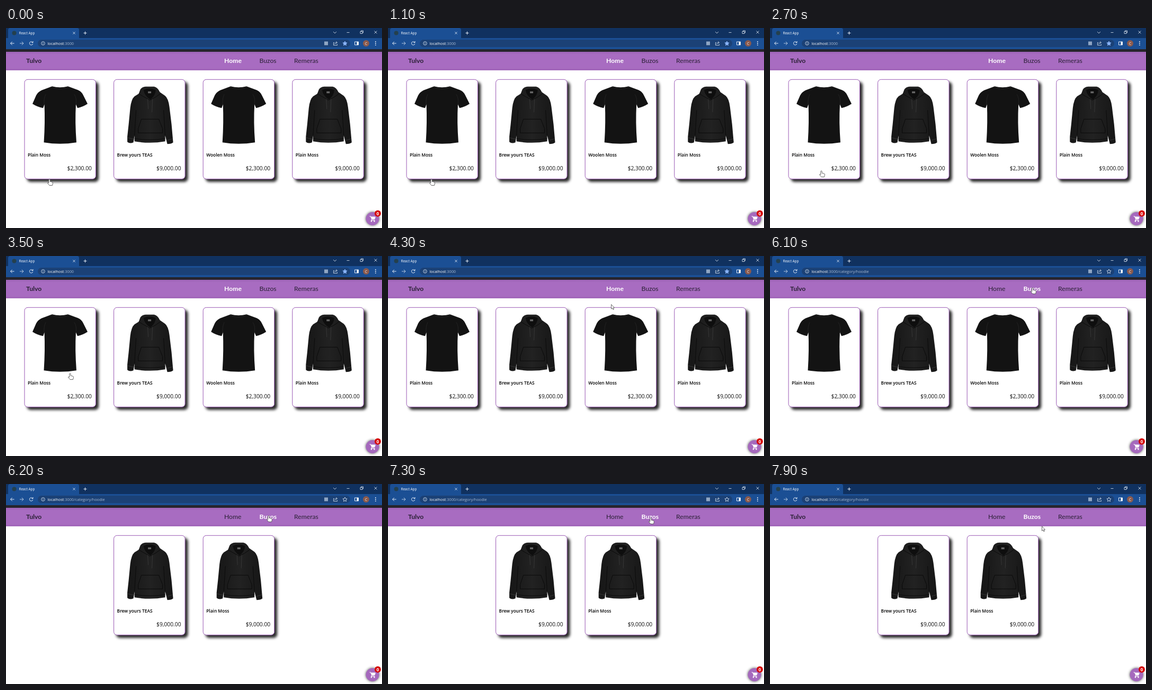
These frames come from a looping animation (710 px wide and 378 px high, 8000 ms). An HTML page:

```html
<!DOCTYPE html>
<html lang="es">
<head>
<meta charset="utf-8">
<title>React App</title>
<style>
html, body { margin: 0; width: 100%; height: 100%; overflow: hidden; background: #fff; }
svg { display: block; width: 710px; height: 378px; font-family: "Open Sans", "Noto Sans", sans-serif; }
filter { color-interpolation-filters: sRGB; }
.nav { font: 12.2px Lato, sans-serif; fill: #2a2035; }
.brand { font-weight: 700; }
.active { font-weight: 700; fill: #fff; }
.line { fill: none; stroke: #e4ecf7; stroke-width: 1; }
.dim { fill: #a9bbd4; }
.title { font-size: 8.4px; font-weight: 600; }
.price { font-size: 10.3px; text-anchor: end; fill: #111; }
</style>
</head>
<body>
<svg viewBox="0 0 710 378">
  <defs>
    <filter id="shade" x="-20%" y="-20%" width="150%" height="150%">
      <feDropShadow dx="5" dy="5" stdDeviation="2.7" flood-color="#2a2a2a"/>
    </filter>
    <filter id="glow" x="-50%" y="-50%" width="200%" height="200%">
      <feDropShadow dx="0" dy="0" stdDeviation="2.5" flood-color="#222" flood-opacity=".8"/>
    </filter>
    <linearGradient id="band" x2="0" y2="1">
      <stop stop-color="#9f64b7"/><stop offset=".15" stop-color="#a86cc1"/>
      <stop offset=".85" stop-color="#a86cc1"/><stop offset="1" stop-color="#9f64b7"/>
    </linearGradient>
    <linearGradient id="cloth">
      <stop stop-color="#161616"/><stop offset=".5" stop-color="#222"/><stop offset="1" stop-color="#161616"/>
    </linearGradient>
    <!-- garments, relative to the card corner -->
    <g id="shirt">
      <path fill="#131313" d="M52 13Q67 17 82 13L101 20Q108 23 111 30L119 46Q110 52 100 54L97 47Q95 80 98 119Q67 124 36.500 119Q39 80 37.500 47L35 54Q24 52 15 46L22 30Q25 24 32 20.500Z"/>
      <path fill="none" stroke="#2a2a2a" stroke-width=".7" d="M50 14Q67 22 84 14M37 47Q36 36 40 28M97 47Q99 36 94 28"/>
    </g>
    <g id="hoodie">
      <path fill="url(#cloth)" d="M50 19Q53 14 60 13.500H76Q83 15 87 24L97 31Q103 36 105 52L109 85L112 119Q109 122 101 122L97 106V117Q68 122 39 117V106L37 119Q30 122 25.500 118V108L28 85L31 54Q33 37 39 32L47 27Z"/>
      <path fill="#0e0e0e" d="M56 20Q67 14 79 20Q79 30 69 38Q58 31 56 20Z"/>
      <path fill="#666" d="M64.500 22.500H70.500V26H64.500Z"/>
      <path fill="none" stroke="#0b0b0b" stroke-width="1" d="M47 27Q57 33 68 39Q79 34 88 27M39 106L42 58M97 106L94 58M39 112Q68 116 97 112M52 75H85L92 93V101H46V93Z"/>
      <path fill="none" stroke="#3d3d3d" stroke-width=".8" d="M64 37L65 56M73 37L72 62M26 110L38 113M101 115L111 112"/>
    </g>
  </defs>

  <path fill="#10315f" d="M0 0H710V19H0Z"/>
  <path fill="#1b4f94" d="M0 19H4V4Q4 0 8 0H134Q138 0 138 4V19H710V40H0Z"/>
  <path fill="#26252d" d="M0 40H710V46H0Z"/>
  <rect x="60" y="22" width="590" height="14" rx="7" fill="#1b4176"/>
  <circle cx="15.500" cy="9.500" r="4" fill="#24404d"/>
  <text x="24.500" y="12" font-size="6.4" fill="#fff">React App</text>
  <g class="line">
    <path d="M126.500 7.500l4 4m0-4l-4 4M146.500 9.500h6m-3-3v6"/>
    <path stroke-width=".8" d="M618 7l3 3 3-3M643.500 8.500h5M669 6.500h4v4h-4zM670.500 6.500v-1.500h4v4h-1.500M695.500 5.500l5 5m0-5l-5 5"/>
    <path d="M15.500 29h-7m3.200-3.200L8.500 29l3.200 3.200"/>
    <path opacity=".75" d="M26 29h7m-3.200-3.200L33 29l-3.200 3.200"/>
    <path d="M50 26.800a3.200 3.200 0 1 0 .7 3M51 25v2.600h-2.600"/>
    <path stroke-width=".8" d="M73.300 29a3.300 3.300 0 1 1-6.600 0a3.300 3.300 0 1 1 6.600 0M70 28.500v2.200m0-3.700v.8"/>
    <path stroke-width=".8" d="M620 27.500h-1.500v5h7v-2M620.500 30.500q.5-3 4-3m-1.500-2l2.500 2-2.500 2"/>
    <path d="M658.500 26h7v6h-7z"/>
  </g>
  <path fill="#fff" d="M662.500 26h3v6h-3z"/>
  <rect x="601" y="25.500" width="7" height="7" fill="#8fa6c4"/>
  <path id="star" stroke-width=".9" d="M640 25l1.200 2.700 2.900.3-2.200 2 .6 2.900-2.500-1.500-2.500 1.500.6-2.900-2.200-2 2.900-.3z"/>
  <circle cx="680" cy="29" r="6" fill="#8b5a4d"/>
  <text x="680" y="31.500" font-size="6.500" fill="#fff" text-anchor="middle">C</text>
  <path fill="#e4ecf7" d="M697 25h1.700v1.700H697zM697 28.200h1.700v1.700H697zM697 31.400h1.700v1.700H697z"/>
  <text x="78.500" y="31.700" font-size="7.35" fill="#fff">localhost<tspan class="dim" id="path"></tspan></text>

  <path fill="url(#band)" d="M0 45H710V80H0Z"/>
  <text class="nav brand" x="38" y="66">Tulvo</text>
  <text class="nav" id="home" x="412" y="66">Home</text>
  <text class="nav" id="buzos" x="478.500" y="66">Buzos</text>
  <text class="nav" x="544" y="66">Remeras</text>

  <g id="all"></g>
  <g id="hoodies"></g>

  <circle cx="692" cy="360.500" r="12.500" fill="#a569bd" filter="url(#glow)"/>
  <path fill="none" stroke="#fff" stroke-width="1.200" d="M686.500 356h2l2.500 5.500h4.500l2-4"/>
  <path fill="#fff" d="M689 356.500h8.500l-2 4.500h-4.500z"/>
  <path fill="none" stroke="#fff" d="M690.500 361.500l-1 2h7"/>
  <circle cx="690" cy="365.300" r="1.200" fill="#fff"/><circle cx="695.500" cy="365.300" r="1.200" fill="#fff"/>
  <circle cx="702" cy="350.500" r="6" fill="#d50000"/>
  <text x="702" y="353.600" font-size="8.500" font-weight="700" fill="#fff" text-anchor="middle">0</text>

  <path id="cursor" fill="#fff" stroke="#444" stroke-width=".8" stroke-linejoin="round"/>
</svg>
<script>
const $ = id => document.getElementById(id);
const LOOP = 8000, STEP = 100, CLICK = 4800, LOADED = 6200;
const CARD_W = 134.5;
const column = i => 35 + 168.6 * i;

const HAND = "M-1.200 1.200Q0-.6 1.200 1.200V4.800L5 5.600Q6.700 6.200 6.400 8L5.500 12H0L-3.700 7.600Q-3.300 5.800-1.200 7.600Z";
const ARROW = "M0 0V8.500L2 6.800 3.400 9.800 4.800 9.200 3.500 6.300H6Z";

const card = (i, kind, title, price) => `<g transform="translate(${column(i)} 97.300)">
  <rect width="${CARD_W}" height="188" rx="6" fill="#fff" stroke="#9b59b6" filter="url(#shade)"/>
  <use href="#${kind}"/>
  <text class="title" x="6" y="145.500">${title}</text>
  <text class="price" x="127" y="172">${price}</text></g>`;
const shirt = (i, title) => card(i, "shirt", title, "$2,300.00");
const hoodie = (i, title) => card(i, "hoodie", title, "$9,000.00");

$("all").innerHTML = shirt(0, "Plain Moss") + hoodie(1, "Brew yours TEAS") +
  shirt(2, "Woolen Moss") + hoodie(3, "Plain Moss");
$("hoodies").innerHTML = hoodie(1, "Brew yours TEAS") + hoodie(2, "Plain Moss");

// pointer tip: time, x, y
const track = [
  [0, 82, 285.5], [2600, 82, 285.5], [2700, 97, 269.5], [2800, 97, 260.5],
  [2900, 97, 260.5], [3500, 121, 221.5], [3800, 121, 221.5], [4500, 496, 59.5],
  [7000, 496, 59.5], [7300, 496, 63.5], [7500, 496, 63.5], [7600, 530, 70],
  [7700, 560, 77], [7800, 540, 80], [7900, 513.5, 80], [LOOP, 513.5, 80]
];

function pointer(t) {
  const k = track.findIndex(p => p[0] > t);
  const [t0, x0, y0] = track[k - 1], [t1, x1, y1] = track[k];
  const u = (t - t0) / (t1 - t0), e = u * u * (3 - 2 * u);
  return [x0 + (x1 - x0) * e, y0 + (y1 - y0) * e];
}

function clickable(x, y, columns) {
  const onLink = x > 478 && x < 511 && y > 54 && y < 72;
  const onCard = y > 97 && y < 286 &&
    columns.some(i => x > column(i) && x < column(i) + CARD_W);
  return onLink || onCard;
}

function draw(now) {
  const t = Math.floor(now % LOOP / STEP) * STEP;
  const clicked = t >= CLICK, loaded = t >= LOADED;
  $("path").textContent = clicked ? ":3000/category/hoodie" : ":3000";
  $("star").setAttribute("fill", clicked ? "none" : "#8ab4f8");
  $("star").setAttribute("stroke", clicked ? "#d5e0ef" : "#8ab4f8");
  $("home").classList.toggle("active", !clicked);
  $("buzos").classList.toggle("active", clicked);
  $("all").style.display = loaded ? "none" : "";
  $("hoodies").style.display = loaded ? "" : "none";

  const [x, y] = pointer(t);
  const hand = clickable(x, y, loaded ? [1, 2] : [0, 1, 2, 3]);
  $("cursor").setAttribute("d", hand ? HAND : ARROW);
  $("cursor").setAttribute("transform", `translate(${x} ${y})`);
}

const start = performance.now();
function tick() {
  draw(performance.now() - start);
  requestAnimationFrame(tick);
}
tick();
</script>
</body>
</html>
```
